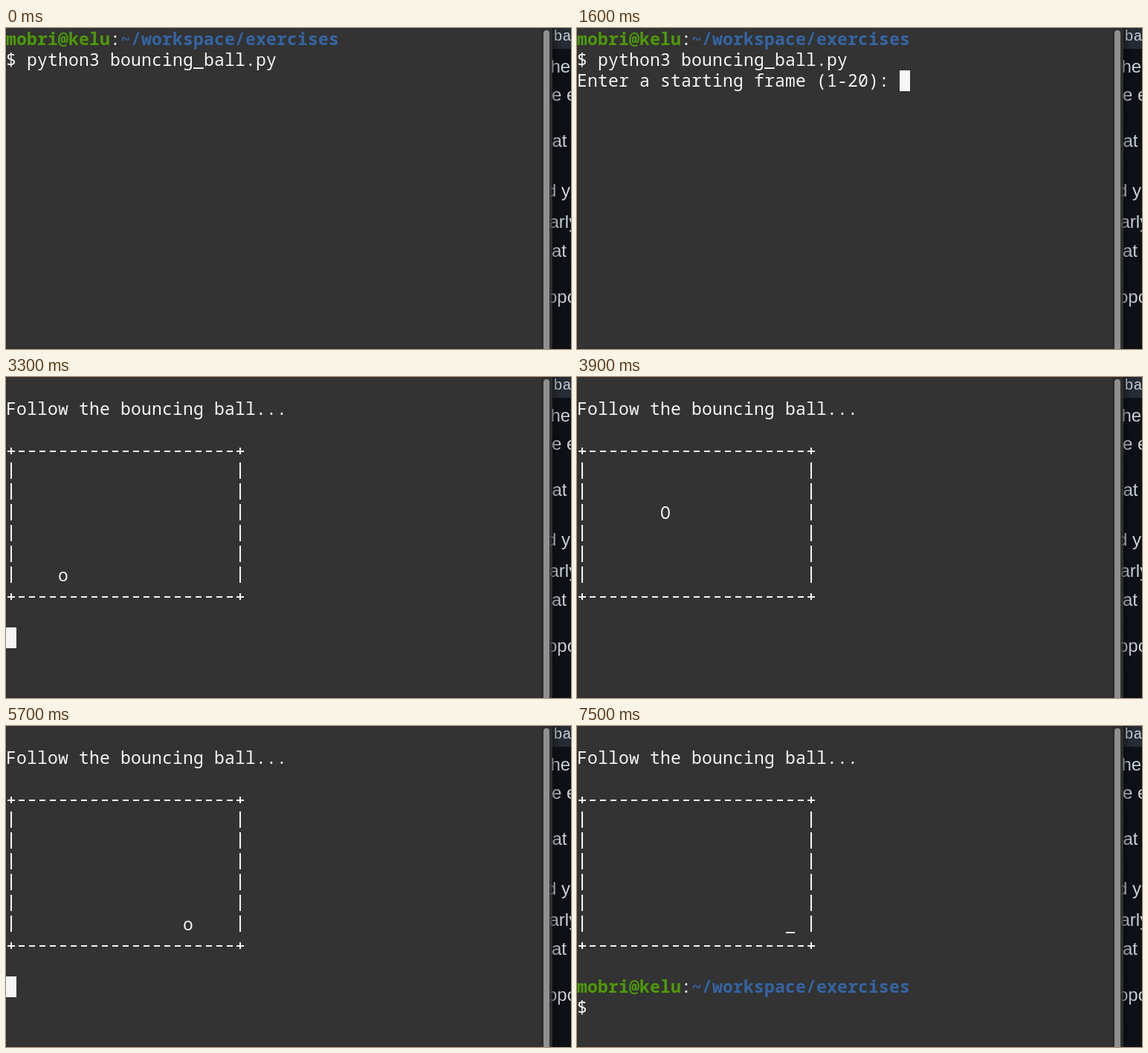
These frames come from a looping animation (760x432 px, 8 s). An HTML page with a canvas:

```html
<!DOCTYPE html>
<html lang="en">
<head>
<meta charset="utf-8">
<title>Terminal ball</title>
<style>
  html, body { margin: 0; width: 100%; height: 100%; overflow: hidden; background: #333; }
  canvas { display: block; width: 760px; height: 432px; }
</style>
</head>
<body>
<canvas id="stage" width="760" height="432"></canvas>
<script>
const ctx = document.getElementById('stage').getContext('2d');
const LOOP = 8000, COL = 14, ROW = 28;
const MONO = '23px "Noto Sans Mono", "DejaVu Sans Mono", monospace';
const WHITE = '#f5f5f5', GREEN = '#4e9a06', BLUE = '#3465a4';

// Height of the ball above the floor at each 200 ms step
const HEIGHTS = [0, 1, 2, 3, 2, 1, 0, 1, 2, 1, 0, 1, 0, 0, 0, 0];

function rect(x, y, w, h, color) {
  ctx.fillStyle = color;
  ctx.fillRect(x, y, w, h);
}

// Terminal text, one character per cell
function put(text, col, row, color = WHITE, bold = false) {
  ctx.font = (bold ? 'bold ' : '') + MONO;
  ctx.textAlign = 'center';
  ctx.fillStyle = color;
  [...text].forEach((ch, i) => ctx.fillText(ch, (col + i + 0.5) * COL, row * ROW + 23));
}

function prompt(row) {
  put('mobri@kelu', 0, row, GREEN, true);
  put(':', 10, row);
  put('~/workspace/exercises', 11, row, BLUE, true);
  put('$', 0, row + 1);
}

function cursor(col, row) {
  rect(col * COL, row * ROW + 1, COL, ROW, WHITE);
}

function box() {
  for (const row of [3, 10]) {
    const y = row * ROW + 16;
    for (let col = 0; col <= 22; col++) {
      const x = col * COL;
      if (col % 22) {
        rect(x + 3, y - 1, 8, 2, WHITE);
      } else {
        rect(x + 2, y - 1, 10, 2, WHITE);
        rect(x + 6, y - 5, 2, 9, WHITE);
      }
    }
  }
  for (let row = 4; row <= 9; row++) {
    for (const col of [0, 22]) rect(col * COL + 6, row * ROW + 3, 2, 22, WHITE);
  }
}

function ball(t) {
  const step = Math.min(15, Math.floor((t - 3300) / 200));
  const col = 5 + step - (step > 12 ? 0 : 0) + (step > 12 ? 1 : 0) - (step > 13 ? 0 : 0);
  const x = Math.min(col, 20);
  const h = HEIGHTS[step];
  if (step === 15) rect(x * COL + 1, 277, 12, 2, WHITE);
  else put(h ? 'O' : 'o', x, 9 - h);
}

function page() {
  rect(735, 0, 25, 432, '#0d1117');
  rect(735, 0, 25, 28, '#262c36');
  ctx.save();
  ctx.beginPath();
  ctx.rect(732, 0, 28, 432);
  ctx.clip();
  ctx.textAlign = 'left';
  ctx.fillStyle = '#c9d1d9';
  ctx.font = '20px "Liberation Mono", monospace';
  ctx.fillText('ba', 736.5, 17);
  ctx.font = '24px "Liberation Sans", Arial, sans-serif';
  const lines = [['he', 732.5, 60], ['e e', 734, 98], ['at', 734.5, 160], ['d y', 727, 227],
    ['arly', 730.5, 269], ['at', 734, 308], ['opo', 728, 370]];
  for (const [text, x, y] of lines) ctx.fillText(text, x, y);
  ctx.restore();

  const shade = ctx.createLinearGradient(735, 0, 747, 0);
  shade.addColorStop(0, 'rgba(0,0,0,.35)');
  shade.addColorStop(1, 'rgba(0,0,0,0)');
  rect(735, 0, 12, 432, shade);
  rect(731, 0, 4, 432, 'rgba(46,46,46,.8)');
}

function frameEdge() {
  rect(720, 0, 3, 432, '#2d2d2d');
  rect(0, 430, 723, 2, '#303030');
  rect(723, 0, 8, 432, '#2d2d2d');
  ctx.fillStyle = '#8f8f8f';
  ctx.beginPath();
  ctx.roundRect(723, 3, 8, 440, 4);
  ctx.fill();
}

function askScene(t) {
  prompt(0);
  put('python3 bouncing_ball.py', 2, 1);
  if (t < 500) return;
  put('Enter a starting frame (1-20):', 0, 2);
  if (t >= 2800) {
    put('5', 31, 2);
    cursor(32, 2);
  } else if (t < 1000 || (t >= 1600 && t < 2200)) {
    cursor(31, 2);
  }
}

function ballScene(t) {
  put('Follow the bouncing ball...', 0, 1);
  box();
  ball(t);
  if (t >= 6500) {
    prompt(12);
    if (t >= 6900 && t < 7500) cursor(2, 13);
  } else if (Math.floor((t - 3300) / 600) % 2 === 0 && t < 6300) {
    cursor(0, 12);
  }
}

function draw(t) {
  rect(0, 0, 760, 432, '#333333');
  page();
  frameEdge();
  if (t < 3300) askScene(t);
  else ballScene(t);
}

const start = performance.now();
function tick() {
  draw((performance.now() - start) % LOOP);
  requestAnimationFrame(tick);
}
tick();
</script>
</body>
</html>
```
